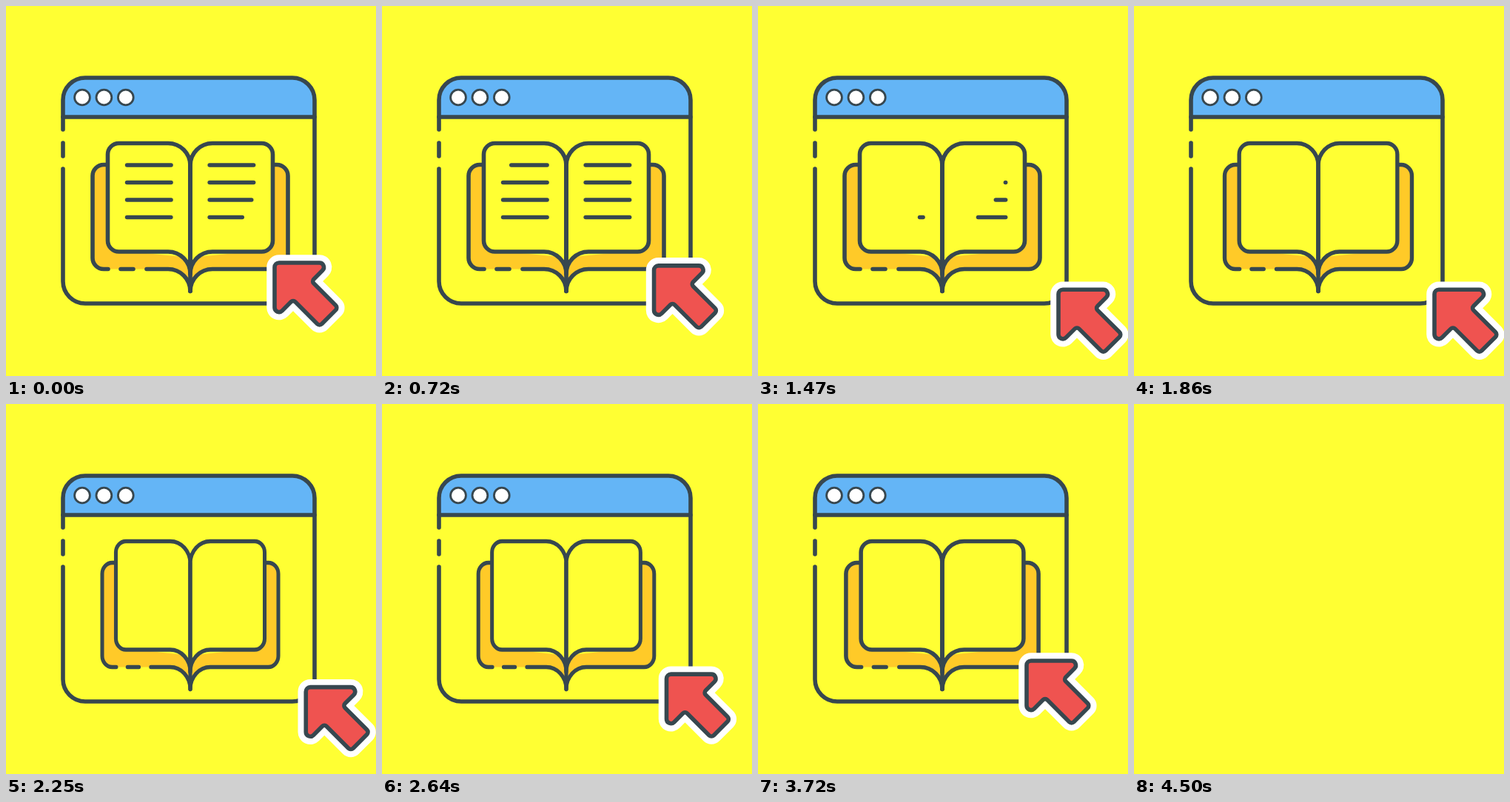
These frames come from a looping animation (500 px wide and 500 px high, 4.53 s). An HTML page with a canvas:

```html
<!DOCTYPE html>
<html lang="en">
<head>
<meta charset="utf-8">
<title>Online book</title>
<style>
html, body { margin: 0; width: 100%; height: 100%; overflow: hidden; background: #ffff33; }
canvas { display: block; width: 100vw; height: 100vh; }
</style>
</head>
<body>
<canvas id="stage" width="500" height="500"></canvas>
<script>
const ctx = document.getElementById('stage').getContext('2d');
const STEP = 30, LOOP = 4530, LAST = 150;
const PAPER = '#ffff33', INK = '#37474f', BLUE = '#64b5f6', AMBER = '#ffca28', RED = '#ef5350';
const SPINE = 249;

const smooth = t => t * t * (3 - 2 * t);
const phase = (f, start, length) => Math.min(1, Math.max(0, (f - start) / length));
const ramp = (f, start, length) => smooth(phase(f, start, length));

// Bezier ease with handles (.55, 0) and (.45, 1)
function glide(t) {
  let lo = 0, hi = 1;
  for (let i = 0; i < 24; i++) {
    const s = (lo + hi) / 2, r = 1 - s;
    const x = 1.65 * r * r * s + 1.35 * r * s * s + s * s * s;
    if (x < t) lo = s; else hi = s;
  }
  return smooth(lo);
}

function stroke(path, width = 5.6, color = INK) {
  ctx.lineWidth = width;
  ctx.strokeStyle = color;
  ctx.stroke(path);
}

function fill(path, color) {
  ctx.fillStyle = color;
  ctx.fill(path);
}

function line(x1, y1, x2, y2) {
  const p = new Path2D();
  p.moveTo(x1, y1);
  p.lineTo(x2, y2);
  stroke(p);
}

const header = new Path2D('M77 150V127A30 30 0 0 1 107 97H387A30 30 0 0 1 417 127V150Z');
const frame = new Path2D('M77 220V372A30 30 0 0 0 107 402H387A30 30 0 0 0 417 372V150');

function drawWindow() {
  stroke(frame);
  line(77, 150, 77, 167);
  line(77, 185, 77, 203);
  fill(header, BLUE);
  stroke(header);
  for (const x of [103, 132.4, 161.8]) {
    const dot = new Path2D();
    dot.arc(x, 123.5, 10.4, 0, Math.PI * 2);
    fill(dot, '#fff');
    stroke(dot, 2.8);
  }
}

// Half shapes are relative to the spine and mirrored for the other side.
const page = new Path2D('M0 215.5A30 30 0 0 0 -30 185.5H-96.5A15 15 0 0 0 -111.5 200.5V317A15 15 0 0 0 -96.5 332H-30A30 30 0 0 1 0 362Z');
const coverFill = new Path2D('M0 340V385.5A30 30 0 0 0 -30 355.5H-117A15 15 0 0 1 -132 340.5V229.5A15 15 0 0 1 -117 214.5H-100V330Z');
const coverSolid = new Path2D('M0 385.5A30 30 0 0 0 -30 355.5H-117A15 15 0 0 1 -132 340.5V229.5A15 15 0 0 1 -117 214.5H-111');
const coverDashed = new Path2D('M0 385.5A30 30 0 0 0 -30 355.5H-59M-77 355.5H-94M-111 355.5H-117A15 15 0 0 1 -132 340.5V229.5A15 15 0 0 1 -117 214.5H-111');

function drawHalf(side, cover) {
  ctx.save();
  ctx.scale(side, 1);
  fill(coverFill, AMBER);
  stroke(cover);
  fill(page, PAPER);
  stroke(page);
  ctx.restore();
}

function drawText(f) {
  for (let side = 0; side < 2; side++) {
    const x = side ? 26.2 : -85.4;
    for (let row = 0; row < 4; row++) {
      const order = row + side * 1.5;
      // The writing phase runs past the end of the loop.
      const g = f < 15 ? f + LAST : f;
      const writing = g > 100;
      const from = writing ? 0 : ramp(g, 19 + order * 5, 18);
      const to = writing ? ramp(g, 124.15 + order * 3.3, 16.5) : 1;
      const y = 215 + row * 23.5;
      if (to - from > 0.002) line(x + from * 59.4, y, x + to * 59.4, y);
    }
  }
}

function drawBook(f) {
  const squeeze = ramp(f, 50, 27) - ramp(f, 105, 25);
  ctx.save();
  ctx.translate(SPINE, 0);
  ctx.scale(1 - 0.1 * squeeze, 1);
  drawHalf(1, coverDashed);
  drawHalf(-1, coverSolid);
  line(0, 215, 0, 385);
  drawText(f);
  ctx.restore();
}

function roundedShape(corners) {
  const p = new Path2D();
  p.moveTo(30, 0);
  corners.forEach(([x, y, r], i) => {
    const next = corners[(i + 1) % corners.length];
    p.arcTo(x, y, next[0], next[1], r);
  });
  p.closePath();
  return p;
}

const arrow = roundedShape([
  [75, 0, 6], [50, 25, 4], [85.7, 60.7, 4.5], [60.7, 85.7, 4.5],
  [25, 50, 4], [0, 75, 6], [0, 0, 6]
]);

function drawArrow(f) {
  const away = glide(phase(f, 15, 34)) - glide(phase(f, 71, 34));
  ctx.save();
  ctx.translate(363 + 43 * away, 347 + 36.3 * away);
  stroke(arrow, 21.5, '#fff');
  fill(arrow, RED);
  stroke(arrow);
  ctx.restore();
}

function draw(f) {
  ctx.fillStyle = PAPER;
  ctx.fillRect(0, 0, 500, 500);
  if (f >= LAST) return;
  ctx.lineCap = ctx.lineJoin = 'round';
  drawWindow();
  drawBook(f);
  drawArrow(f);
}

const begin = performance.now();
function tick() {
  const time = (performance.now() - begin) % LOOP;
  draw(Math.floor(time / STEP));
  requestAnimationFrame(tick);
}
tick();
</script>
</body>
</html>
```
